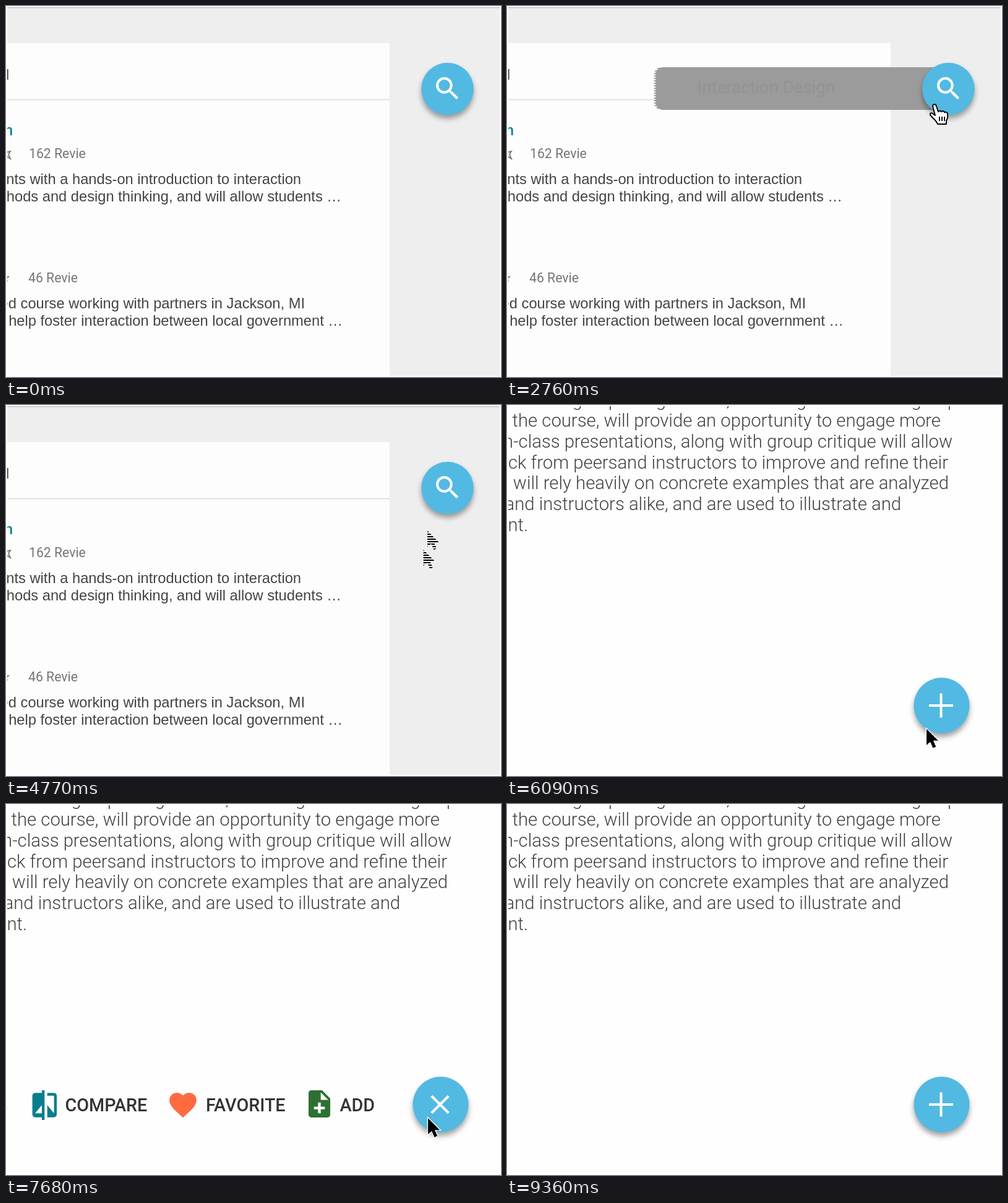
These frames come from a looping animation (800 px wide and 600 px high, 9840 ms). An HTML page:

```html
<!DOCTYPE html>
<html lang="en">
<head>
<meta charset="utf-8">
<title>Floating action buttons</title>
<style>
  html, body { margin: 0; width: 100%; height: 100%; overflow: hidden; background: #fff; }
  svg { display: block; width: 800px; height: 600px; }
  text { white-space: pre; }
  .body { font: 23.7px "Liberation Sans", Arial, sans-serif; fill: #444; text-anchor: end; }
  .meta { font: 21.2px Roboto, sans-serif; fill: #757575; }
  .para { font: 300 29.25px Roboto, sans-serif; fill: #404040; text-anchor: end; }
  .label { font: 500 28.7px Roboto, sans-serif; fill: #333; }
  .query { font: 27.5px Roboto, sans-serif; fill: #444; }
  .fab { fill: #52b9e3; filter: drop-shadow(0 6px 4px rgba(0, 0, 0, .36)); }
</style>
</head>
<body>
<svg viewBox="0 0 800 600">
  <defs>
    <clipPath id="rows0"><path/></clipPath>
    <clipPath id="rows1"><path/></clipPath>
    <path id="arrow" transform="scale(.87)" d="M0 0V30l7-6 5 11.5 5.500-2.500-5-11h9.500z" fill="#000" stroke="#fff" stroke-width="2.800" paint-order="stroke"/>
    <g id="hand" transform="translate(-7 -2)" stroke="#000" stroke-width="1.900" stroke-linejoin="round">
      <path d="M5 4c0-4 5-4 6 0l3 9c1-2 4-2 5 0 2-2 5-1 5 1 3-1 5 0 5 3 1 6-1 8-2 11v5H13C11 27 3 22 1 18c-1-3 3-4 5-1l3 2z" fill="#fff"/>
      <path d="M16 21v7m4-7v7m4-7v7" fill="none"/>
    </g>
  </defs>

  <g id="results">
    <rect width="800" height="600" fill="#eee"/>
    <path d="M0 2.500H800" stroke="#b8b8b8" stroke-width="1.500"/>
    <rect y="60" width="620" height="540" fill="#fdfdfd"/>
    <path d="M0 151.500H620" stroke="#e2e2e2" stroke-width="2"/>
    <path d="M2.500 102V119" stroke="#222" stroke-width="2"/>
    <text x="11" y="209" text-anchor="end" font-family="Roboto, sans-serif" font-size="24" font-weight="500" fill="#00838f">n</text>
    <path d="M0 237l7-2-3 5 3 7-6-4" fill="none" stroke="#757575" stroke-width="1.800"/>
    <path d="M0 437h6l-4 4 1 5-3-2z" fill="#757575"/>
    <text class="meta" x="37" y="246">162 Revie</text>
    <text class="meta" x="36" y="447">46 Revie</text>
    <text class="body" x="477" y="288">students with a hands-on introduction to interaction</text>
    <text class="body" x="542" y="316">methods and design thinking, and will allow students …</text>
    <text class="body" x="483" y="489">based course working with partners in Jackson, MI</text>
    <text class="body" x="544" y="517">help foster interaction between local government …</text>
    <g id="bars"></g>
    <circle class="fab" cx="713.500" cy="134" r="42.300"/>
    <path transform="translate(688.800 108.800) scale(2.060)" fill="#fff" d="M15.500 14h-.79l-.28-.27A6.500 6.500 0 1 0 13.730 14.430l.27.28v.79l5 4.990L20.490 19zM9.500 14a4.500 4.500 0 1 1 0-9 4.500 4.500 0 0 1 0 9z"/>
  </g>

  <g id="course">
    <rect width="800" height="600" fill="#fefefe"/>
    <g id="paragraph"></g>
    <g id="menu"></g>
    <circle class="fab" cx="702.500" cy="486" r="45"/>
    <path id="plus" d="M-19.500 0h39M0-19.500v39" stroke="#fff" stroke-width="4"/>
  </g>

  <g id="pointers"></g>
  <rect x="1" y="1" width="798" height="598" fill="none" stroke="#fff" stroke-width="2"/>
</svg>
<script>
const LOOP = 9840, STEP = 30, FIELD = 17, CUT = 5130;
const $ = id => document.getElementById(id);
const ease = p => p * p * (3 - 2 * p);
const ramp = (t, from, to) => ease(Math.min(1, Math.max(0, (t - from) / (to - from))));

// Eased value at t through keys of [time, ...values]
function track(t, keys) {
  let i = 0;
  while (i < keys.length - 2 && t >= keys[i + 1][0]) i++;
  const [a, b] = [keys[i], keys[i + 1]], p = ramp(t, a[0], b[0]);
  return a.slice(1).map((v, k) => v + (b[k + 1] - v) * p);
}

// Moving parts are drawn as two interlaced fields
const fields = [0, 1].map(n => {
  let rows = '';
  for (let y = 2 * n; y < 600; y += 4) rows += `M0 ${y}h800v2h-800z`;
  document.querySelector(`#rows${n} path`).setAttribute('d', rows);
  const add = (parent, html) => {
    $(parent).insertAdjacentHTML('beforeend', `<g clip-path="url(#rows${n})">${html}</g>`);
    return $(parent).lastElementChild;
  };
  const bar = add('bars', `<rect y="99" height="69" rx="12" fill="#9b9b9b"/>
    <text class="query" x="308" y="141">Interaction Design</text>`);
  const pointer = add('pointers', '<g><use href="#arrow"/><use href="#hand"/></g>');
  const [rect, query] = bar.children, cursor = pointer.firstChild;
  return { lag: n * FIELD, rect, query, cursor, shapes: cursor.children };
});

const lines = [
  [701, 'of the course, will provide an opportunity to engage more'],
  [720, 'In-class presentations, along with group critique will allow'],
  [713, 'back from peersand instructors to improve and refine their'],
  [714, 's will rely heavily on concrete examples that are analyzed'],
  [637, 'and instructors alike, and are used to illustrate and'],
  [34, 'ment.']
];
const above = [[180, 'group'], [360, 'assignments,'], [484, 'including'], [728, 'group']];
const line = (x, y, s) => `<text class="para" x="${x}" y="${y}">${s}</text>`;
$('paragraph').innerHTML = above.map(([x, s]) => line(x, 1.5, s)).join('') +
  lines.map(([x, s], i) => line(x, 35 + i * 33.8, s)).join('');

const items = [
  { name: 'ADD', x: 539.5, cx: 506.5, cy: 485, color: '#2e7033',
    icon: 'M14 2H6c-1.1 0-2 .9-2 2v16c0 1.1.9 2 2 2h12c1.1 0 2-.9 2-2V8zm2 14h-3v3h-2v-3H8v-2h3v-3h2v3h3zm-3-7V3.5L18.5 9z' },
  { name: 'FAVORITE', x: 323, cx: 286, cy: 486.7, color: '#ff6a41',
    icon: 'M12 21.35l-1.45-1.32C5.4 15.36 2 12.28 2 8.5 2 5.42 4.42 3 7.5 3c1.74 0 3.41.81 4.5 2.09C13.09 3.81 14.76 3 16.5 3 19.58 3 22 5.42 22 8.5c0 3.78-3.4 6.86-8.55 11.54z' },
  { name: 'COMPARE', x: 95.5, cx: 62.3, cy: 487, color: '#0a7d8d',
    icon: 'M10 3H5c-1.1 0-2 .9-2 2v14c0 1.1.9 2 2 2h5v2h2V1h-2zm0 15H5l5-6zm9-15h-5v2h5v13l-5-6v9h5c1.1 0 2-.9 2-2V5c0-1.1-.9-2-2-2z' },
  { name: 'S', x: -13.5, tint: '#e4e4e4' }
];
$('menu').innerHTML = items.map(({ name, x, cx, cy, color, icon, tint = '#333' }) => `<g>
  ${icon ? `<path transform="translate(${cx} ${cy}) scale(2.19) translate(-12 -12)" fill="${color}" d="${icon}"/>` : ''}
  <text class="label" x="${x}" y="497" style="fill:${tint}">${name}</text></g>`).join('');

function pointerAt(t) {
  if (t < CUT) return t < 4000
    ? track(t, [[1380, 690, 640], [1900, 690, 160]])
    : track(t, [[4720, 690, 160], [4990, 590, 640]]);
  return track(t, [[5700, 585, 612], [6090, 678, 524], [6300, 682, 508], [9240, 682, 508], [9360, 580, 640]]);
}

function drawField(f, t) {
  const [left] = track(t, [[2000, 690], [2350, 185], [3000, 261], [3950, 261], [4500, 690]]);
  f.rect.setAttribute('x', left);
  f.rect.setAttribute('width', 713 - left);
  f.query.setAttribute('opacity', ramp(t, 2690, 3130) - ramp(t, 3930, 4080));

  const [x, y] = pointerAt(t), onButton = t < CUT && y < 172;
  f.cursor.setAttribute('transform', `translate(${x} ${y})`);
  f.shapes[0].style.display = onButton ? 'none' : '';
  f.shapes[1].style.display = onButton ? '' : 'none';
}

function draw(now) {
  const t = Math.floor(now % LOOP / STEP) * STEP;
  $('results').style.display = t < CUT ? '' : 'none';
  $('course').style.display = t < CUT ? 'none' : '';
  for (const f of fields) drawField(f, t + f.lag);

  const turn = ramp(t, 6480, 6840) - ramp(t, 8340, 8700);
  $('plus').setAttribute('transform', `translate(701.5 486) rotate(${45 * turn})`);
  [...$('menu').children].forEach((g, i) => {
    const k = ramp(t, 6480 + i * 130, 6980 + i * 130) - ramp(t, 8700 - i * 120, 9030 - i * 120);
    g.setAttribute('opacity', k);
    g.setAttribute('transform', `translate(${60 * (1 - k)} 0)`);
  });
  requestAnimationFrame(draw);
}
requestAnimationFrame(draw);
</script>
</body>
</html>
```
